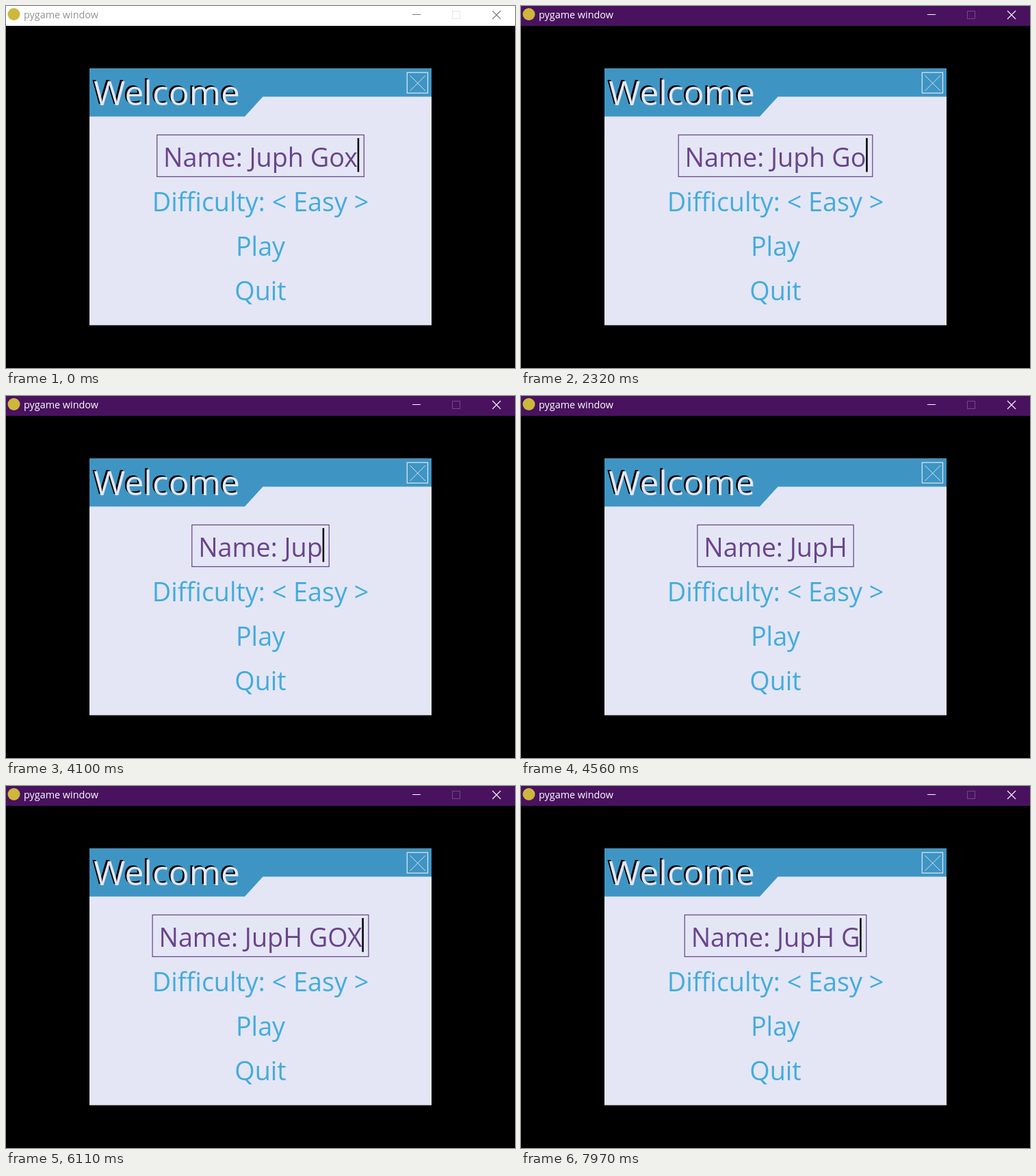
Recreate the animation shown at these times as an HTML page with a canvas. Size 744 by 529 pixels, loop 8000 ms.

```html
<!DOCTYPE html>
<html lang="en">
<head>
<meta charset="utf-8">
<title>pygame window</title>
<style>
  html, body { margin: 0; width: 744px; height: 529px; overflow: hidden; background: #000; }
  canvas { display: block; }
</style>
</head>
<body>
<canvas id="stage" width="744" height="529"></canvas>
<script>
const ctx = document.getElementById('stage').getContext('2d');
const LOOP = 8000;
const MID = 372;
const SIZE = 37.7;
const FONT = '"Open Sans", "Noto Sans", sans-serif';
const PALE = '#e4e6f6', BLUE = '#3e95c3', SKY = '#43acdc', PURPLE = '#69448a';

// [start ms, typed name, caret visible, caret slip in px while the field recentres]
const steps = [
  [0, 'Juph Gox', 1], [140, 'Juph Gox', 0], [530, 'Juph Gox', 1],
  [1080, 'Juph Gox', 0], [1540, 'Juph Gox', 1], [2090, 'Juph Gox', 0],
  [2320, 'Juph Go', 1], [2560, 'Juph G', 1], [2710, 'Juph ', 1],
  [3160, 'Juph', 1, -5], [3240, 'Juph', 1],
  [3470, 'Jup', 1], [3620, 'Jup', 0], [4100, 'Jup', 1],
  [4400, 'JupH', 1, 21], [4480, 'JupH', 1], [4560, 'JupH', 0],
  [4950, 'JupH ', 1], [5100, 'JupH ', 0], [5330, 'JupH G', 1],
  [5490, 'JupH GO', 1, 19], [5570, 'JupH GO', 1],
  [5640, 'JupH GOX', 1, 18], [5720, 'JupH GOX', 0],
  [6110, 'JupH GOX', 1], [6570, 'JupH GOX', 0], [7120, 'JupH GOX', 1],
  [7610, 'JupH GOX', 0], [7820, 'JupH GO', 1, -10], [7900, 'JupH GO', 1],
  [7970, 'JupH G', 1]
];

function rect(x, y, w, h, color) {
  ctx.fillStyle = color;
  ctx.fillRect(x, y, w, h);
}

function frame(x, y, w, h, color, width) {
  ctx.strokeStyle = color;
  ctx.lineWidth = width;
  ctx.strokeRect(x, y, w, h);
}

function cross(x, y, size, color, width) {
  ctx.strokeStyle = color;
  ctx.lineWidth = width;
  ctx.beginPath();
  ctx.moveTo(x, y);
  ctx.lineTo(x + size, y + size);
  ctx.moveTo(x + size, y);
  ctx.lineTo(x, y + size);
  ctx.stroke();
}

function text(str, x, y, size, color) {
  ctx.font = `${size}px ${FONT}`;
  ctx.fillStyle = color;
  ctx.fillText(str, x, y);
}

// Draws a centred menu line and returns its width.
function item(str, y, color) {
  ctx.font = `${SIZE}px ${FONT}`;
  const w = ctx.measureText(str).width;
  text(str, MID - w / 2, y, SIZE, color);
  return w;
}

function titleBar(active) {
  const ink = active ? '#ffffff' : '#777777';
  rect(0, 0, 744, 29, active ? '#49125f' : '#ffffff');
  ctx.fillStyle = '#cdb83c';
  ctx.beginPath();
  ctx.arc(11.5, 12, 9, 0, Math.PI * 2);
  ctx.fill();
  text('pygame window', 26, 18, 14.4, active ? '#ffffff' : '#929292');
  rect(594, 12, 12, 1, ink);
  frame(652.5, 7.5, 11, 11, active ? '#75478a' : '#e4e4e4', 1);
  cross(711, 7, 12, ink, 1.1);
}

function menu() {
  rect(122, 91.5, 500, 375, PALE);
  ctx.fillStyle = BLUE;
  ctx.beginPath();
  for (const [x, y] of [[122, 91.5], [622, 91.5], [622, 132.6], [375.5, 132.6], [349, 161.5], [122, 161.5]])
    ctx.lineTo(x, y);
  ctx.fill();
  text('Welcome', 125.8, 142.5, 49.8, '#000');
  text('Welcome', 128.3, 145, 49.8, PALE);
  frame(586.3, 97.2, 30.2, 30, PALE, 1.2);
  cross(590.5, 101.5, 22.5, PALE, 0.9);
  item('Difficulty: < Easy >', 299.5, SKY);
  item('Play', 364.5, SKY);
  item('Quit', 429.5, SKY);
}

function field(name, caret, slip = 0) {
  const w = item('Name: ' + name, 234.5, PURPLE);
  const box = w + 18.8;
  frame(MID - box / 2, 188.4, box, 61, PURPLE, 1.25);
  if (caret) rect(MID + w / 2 - 0.2 + slip, 193, 2.5, 49.5, '#000');
}

function draw(now) {
  const t = now % LOOP;
  const step = steps.findLast(s => s[0] <= t) || steps[0];
  rect(0, 0, 744, 529, '#000');
  titleBar(t >= 530);
  menu();
  field(...step.slice(1));
}

let start;
function tick(now) {
  start ??= now;
  draw(now - start);
  requestAnimationFrame(tick);
}
draw(0);
requestAnimationFrame(tick);
</script>
</body>
</html>
```
